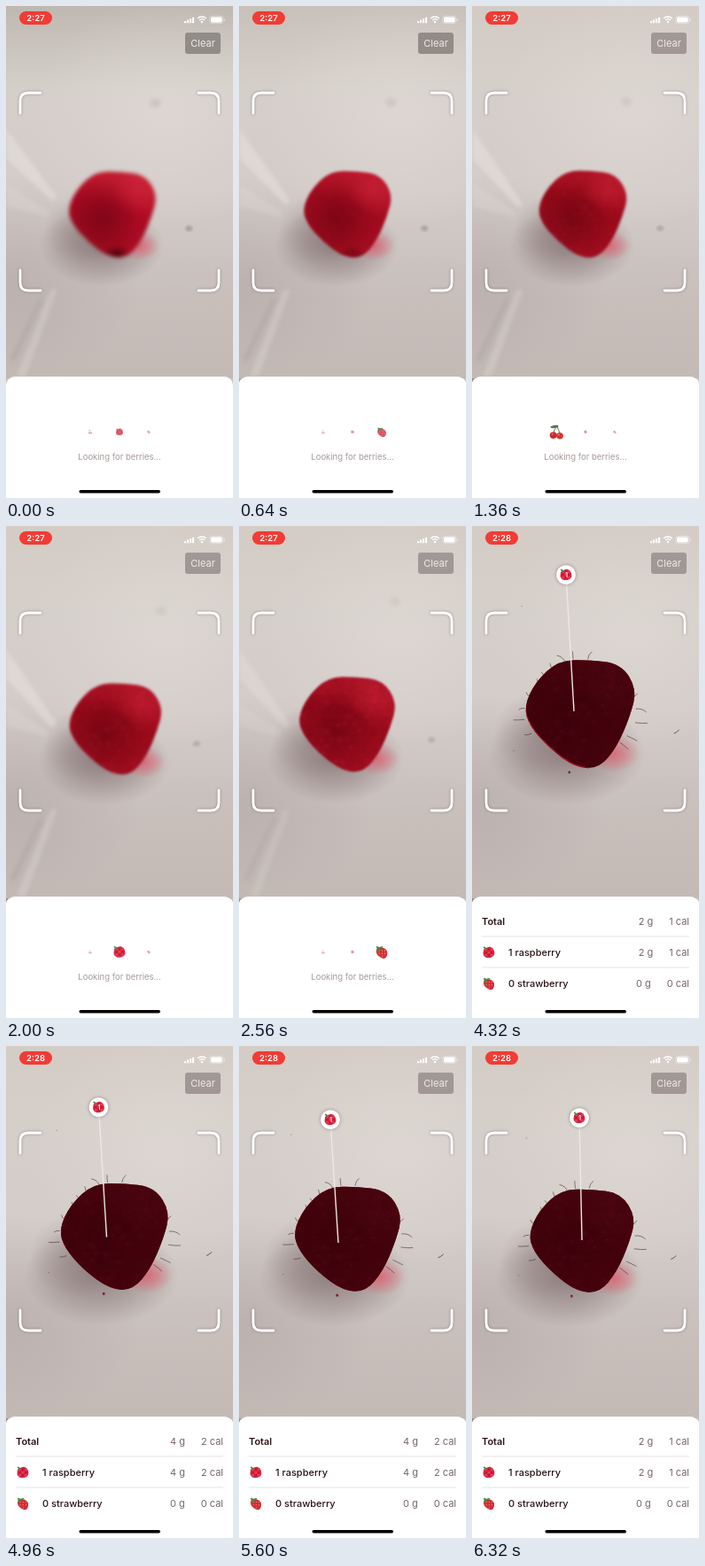
Write an HTML page with a canvas that moves like this. It is 256 px wide and 555 px high and loops after 6400 ms.

```html
<!DOCTYPE html>
<html lang="en">
<head>
<meta charset="utf-8">
<style>
html, body { margin: 0; width: 100%; height: 100%; overflow: hidden; background: #cbc4c0; }
canvas { display: block; width: 256px; height: 555px; }
</style>
</head>
<body>
<canvas id="stage"></canvas>
<script>
const W = 256, H = 555, LOOP = 6400, STEP = 80, DETECTED = 3840;
const dpr = window.devicePixelRatio || 1;
const stage = document.getElementById('stage');
const layer = document.createElement('canvas');
for (const c of [stage, layer]) { c.width = W * dpr; c.height = H * dpr; }
const g = stage.getContext('2d'), b = layer.getContext('2d');
g.scale(dpr, dpr);
b.scale(dpr, dpr);

// time, centre x, centre y, radius, sharpness
const poses = [
  [0, 120, 235.5, 48.5, 0], [1360, 125, 235, 49, .25], [2560, 122, 224, 53.5, .4],
  [3200, 120, 216, 60, 1], [3600, 119, 213.5, 62, 1], [4320, 122, 212.5, 61, 1],
  [5600, 122.5, 218, 59, 1], [6320, 124, 220, 58, 1], [6400, 124, 220, 58, 1]
];
// time, head x, head y, tip x, tip y
const pins = [
  [3840, 104, 52, 114, 209], [4320, 106, 55, 115, 209],
  [5600, 103, 83, 112, 222], [6320, 121, 81, 124, 219], [6400, 121, 81, 124, 219]
];
const outline = [[-.4, -1], [.18, -1.01], [.76, -.93], [1.05, -.46], [.92, .04], [.68, .6],
  [.35, 1], [-.08, .99], [-.57, .63], [-.94, .21], [-1.04, -.14], [-.83, -.6]];

function sample(track, t) {
  let i = 0;
  while (i < track.length - 2 && track[i + 1][0] <= t) i++;
  const [from, to] = [track[i], track[i + 1]];
  const k = Math.max(0, Math.min(1, (t - from[0]) / (to[0] - from[0])));
  return from.slice(1).map((v, j) => v + (to[j + 1] - v) * k);
}

function seeded(seed) {
  return () => (seed = (seed * 16807) % 2147483647) / 2147483647;
}

function blob(c, x, y, r) {
  const at = i => outline[i % outline.length];
  c.beginPath();
  for (let i = 0; i <= outline.length; i++) {
    const [px, py] = at(i), [qx, qy] = at(i + 1);
    const mx = x + (px + qx) / 2 * r, my = y + (py + qy) / 2 * r;
    if (i) c.quadraticCurveTo(x + px * r, y + py * r, mx, my);
    else c.moveTo(mx, my);
  }
  c.closePath();
}

function ellipse(c, x, y, rx, ry, fill, turn = 0) {
  c.fillStyle = fill;
  c.beginPath();
  c.ellipse(x, y, rx, ry, turn, 0, Math.PI * 2);
  c.fill();
}

function box(x, y, w, h, r, fill) {
  g.fillStyle = fill;
  g.beginPath();
  g.roundRect(x, y, w, h, r);
  g.fill();
}

function glow(c, x, y, rx, ry, rgb, alpha) {
  c.save();
  c.translate(x, y);
  c.scale(rx, ry);
  const fade = c.createRadialGradient(0, 0, 0, 0, 0, 1);
  fade.addColorStop(0, `rgba(${rgb},${alpha})`);
  fade.addColorStop(.5, `rgba(${rgb},${alpha * .55})`);
  fade.addColorStop(1, `rgba(${rgb},0)`);
  c.fillStyle = fade;
  c.fillRect(-1, -1, 2, 2);
  c.restore();
}

function text(str, x, y, size, weight, fill, align = 'left') {
  g.font = `${weight} ${size}px Inter, sans-serif`;
  g.textAlign = align;
  g.fillStyle = fill;
  g.fillText(str, x, y);
  return g.measureText(str).width;
}

function streak(points, alpha, rgb) {
  g.fillStyle = `rgba(${rgb},${alpha})`;
  g.beginPath();
  points.forEach(([x, y]) => g.lineTo(x, y));
  g.fill();
}

function drawTable([x, y, r, sharp], t) {
  const late = Math.min(1, t / 1400);
  const wash = g.createLinearGradient(0, 0, 0, 420);
  const top = [190 + 22 * late, 184 + 20 * late, 177 + 20 * late];
  wash.addColorStop(0, `rgb(${top})`);
  wash.addColorStop(.22, '#d5cfca');
  wash.addColorStop(.5, '#d3ccc9');
  wash.addColorStop(.78, '#c8bfbb');
  wash.addColorStop(1, '#c3bab5');
  g.fillStyle = wash;
  g.fillRect(0, 0, W, 420);
  glow(g, 180, 120, 150, 130, '228,222,217', .5);
  glow(g, 0, 310, 150, 120, '165,153,152', .38);

  const marks = Math.max(0, 1 - Math.max(0, t - 2300) / 800);
  if (marks) {
    g.save();
    g.filter = `blur(${2 * dpr}px)`;
    const drift = late * 8;
    streak([[0, 138], [0, 172], [52, 220 + drift], [58, 216 + drift]], .38 * marks, '238,235,233');
    streak([[0, 200], [0, 226], [48, 238], [48, 232]], .22 * marks, '232,229,227');
    streak([[50, 320], [58, 320], [22, 418], [12, 418]], .3 * marks, '230,225,222');
    streak([[38, 330], [42, 330], [10, 400], [4, 400]], .25 * marks, '150,142,139');
    g.restore();
  }

  glow(g, x - r * .25, y + r * .72, r * 1.45, r * .95, '112,91,94', .62);
  glow(g, x - r * .7, y + r * .35, r * .9, r * .8, '125,105,108', .35);
  glow(g, x + r * .62, y + r * .72, r * .48, r * .35, '240,60,85', .55);

  const sx = x + r * 1.78, sy = y + r * .32;
  glow(g, sx, sy, 6, 5, '120,110,106', .5 * (1 - sharp));
  glow(g, x + r, y - r * 2.6, 9, 8, '160,154,149', .3 * (1 - sharp));
  if (sharp > .6) {
    g.strokeStyle = '#655554';
    g.lineWidth = 1;
    g.beginPath();
    g.moveTo(sx - 3, sy + 2);
    g.quadraticCurveTo(sx, sy + 1, sx + 3, sy - 2);
    g.stroke();
    ellipse(g, x - r * .2, y + r * 1.07, 1.4, 1.6, '#702638');
    ellipse(g, x - r * 1.23, y + r * .67, .7, .7, '#806f70');
    ellipse(g, x - r * 1.08, y - r * 2, 1, .7, '#aaa099');
  }
}

function drawHairs(x, y, r, alpha) {
  const rand = seeded(71);
  g.strokeStyle = `rgba(74,48,48,${alpha})`;
  g.lineWidth = .8;
  for (let i = 0; i < 19; i++) {
    const a = Math.PI * (.88 + i / 18 * 1.3) + rand() * .1;
    const edge = r * (.96 + .08 * Math.cos(4 * a));
    const len = 5 + rand() * 9, bend = (rand() - .5) * 1.3;
    const px = x + Math.cos(a) * edge, py = y + Math.sin(a) * edge;
    g.beginPath();
    g.moveTo(px, py);
    g.quadraticCurveTo(px + Math.cos(a) * len * .6, py + Math.sin(a) * len * .6,
      px + Math.cos(a + bend) * len, py + Math.sin(a + bend) * len);
    g.stroke();
  }
}

function drawBerry([x, y, r, sharp], t) {
  b.clearRect(0, 0, W, H);
  b.save();
  blob(b, x, y, r);
  b.clip();
  const skin = b.createLinearGradient(x + r * .5, y - r, x - r * .3, y + r);
  const early = Math.max(0, 1 - t / 1200);
  skin.addColorStop(0, `rgb(${186 + 12 * early},${22 + 12 * early},${42 + 10 * early})`);
  skin.addColorStop(.45, `rgb(${156 + 16 * early},10,${27 + 8 * early})`);
  skin.addColorStop(1, '#a20d20');
  b.fillStyle = skin;
  b.fillRect(0, 0, W, H);
  glow(b, x - r * .25, y + r * .1, r * .9, r * .9, '88,0,12', .5);
  glow(b, x + r * .6, y - r * .55, r * .6, r * .5, '222,44,65', .35);
  glow(b, x + r * .1, y + r * .9, r * .3, r * .18, '50,0,8', .75 * early);

  const rand = seeded(29);
  for (let row = -6; row <= 6; row++) for (let col = -6; col <= 6; col++) {
    const px = x + r * (col * .17 + (row & 1) * .085 + (rand() - .5) * .06);
    const py = y + r * (row * .16 + (rand() - .5) * .06);
    const lit = rand(), size = r * (.075 + rand() * .035);
    ellipse(b, px + 1, py + 1.2, size, size, `rgba(65,0,12,${.22 * sharp})`);
    ellipse(b, px, py, size, size * .85, `rgba(218,38,58,${.24 * lit * sharp})`);
    if (lit > .72) ellipse(b, px - 1, py - 1, 1.4, .7, `rgba(255,130,145,${.35 * sharp})`, -.5);
  }

  if (t >= DETECTED) {
    const [mx, my, mr] = sample(poses, t - 160);
    const slip = Math.max(0, 1 - Math.abs(t - 4320) / 400) * 2;
    b.fillStyle = 'rgba(45,0,8,.78)';
    blob(b, mx + slip, my - slip, mr * 1.01);
    b.fill();
  }
  b.restore();

  if (sharp > .5) drawHairs(x, y, r, (sharp - .5) * 1.5);
  g.save();
  g.filter = `blur(${(.35 + 1.6 * (1 - sharp)) * dpr}px)`;
  g.drawImage(layer, 0, 0, W, H);
  g.restore();
}

function leaf(x, y, turn) {
  ellipse(g, x, y, 2.6, 1.1, '#4d8a45', turn);
}

// Icons are drawn in a 16 px cell around the origin.
const icons = {
  cherry() {
    g.strokeStyle = '#6d7446';
    g.lineWidth = 1;
    g.beginPath();
    g.moveTo(-3, 2);
    g.quadraticCurveTo(-3, -3, 1, -6);
    g.quadraticCurveTo(3, -2, 4, 2);
    g.stroke();
    ellipse(g, -2, -6, 4.5, 1.5, '#55754e', -.15);
    ellipse(g, -3.3, 3.8, 4, 3.7, '#cb292d');
    ellipse(g, 4, 4.3, 3.9, 3.6, '#d63430');
    ellipse(g, -4.4, 2.5, 1.1, .8, '#f08b82');
    ellipse(g, 3, 3, 1.1, .8, '#f08b82');
  },
  raspberry() {
    g.fillStyle = '#d8243f';
    g.beginPath();
    g.moveTo(-6.5, -1);
    g.bezierCurveTo(-7, -5, -3, -5, -2, -6);
    g.bezierCurveTo(2, -8, 6, -5, 6.5, -1);
    g.bezierCurveTo(8, 4, 4, 6.5, 0, 6.5);
    g.bezierCurveTo(-5, 7, -8, 3, -6.5, -1);
    g.fill();
    for (let i = 0; i < 9; i++)
      ellipse(g, (i % 3 - 1) * 3.6, (Math.floor(i / 3) - 1) * 3.4, 1.4, 1.2, i % 2 ? '#ba1732' : '#e94159');
    leaf(-4.5, -5, .7);
  },
  strawberry() {
    g.fillStyle = '#d22d37';
    g.beginPath();
    g.moveTo(-5.5, -4);
    g.bezierCurveTo(1, -7, 7, -3, 6.5, 2);
    g.bezierCurveTo(6, 7, 3, 8, 1, 7.5);
    g.bezierCurveTo(-5, 5, -8, 1, -5.5, -4);
    g.fill();
    for (let i = 0; i < 8; i++)
      ellipse(g, i % 3 * 3.3 - 3, Math.floor(i / 3) * 3.3 - 1.5, .5, .7, '#f3b184');
    leaf(-4, -5, .5);
    leaf(-1, -5, -.3);
    leaf(-4.5, -3, 1.3);
  }
};

function icon(name, x, y, size, alpha = 1) {
  g.save();
  g.globalAlpha = alpha;
  g.translate(x, y);
  g.scale(size / 16, size / 16);
  icons[name]();
  g.restore();
}

function drawFrame() {
  g.save();
  g.strokeStyle = '#fff';
  g.lineWidth = 2.8;
  g.lineCap = 'round';
  g.shadowColor = 'rgba(60,50,50,.45)';
  g.shadowBlur = 3 * dpr;
  for (const sx of [-1, 1]) for (const sy of [-1, 1]) {
    const x = 128 + sx * 112, y = 209.5 + sy * 111.5;
    g.beginPath();
    g.moveTo(x, y - sy * 23);
    g.lineTo(x, y - sy * 9);
    g.quadraticCurveTo(x, y, x - sx * 9, y);
    g.lineTo(x - sx * 23, y);
    g.stroke();
  }
  g.restore();
}

function drawStatus(t) {
  box(15, 6, 37, 15, 7.5, '#f23b34');
  text(t < 3200 ? '2:27' : '2:28', 33.5, 17, 9.5, 600, '#fff', 'center');
  for (let i = 0; i < 4; i++) box(201 + i * 3, 17 - i * 1.4, 2.1, 2.2 + i * 1.4, .5, '#fff');
  g.strokeStyle = '#fff';
  g.lineWidth = 1.4;
  for (const r of [3.8, 6.6]) {
    g.beginPath();
    g.arc(221, 18.6, r, -Math.PI * .76, -Math.PI * .24);
    g.stroke();
  }
  ellipse(g, 221, 18, 1.2, 1.2, '#fff');
  g.strokeStyle = 'rgba(255,255,255,.5)';
  g.lineWidth = .7;
  g.beginPath();
  g.roundRect(229.8, 11.4, 15, 8.2, 2.4);
  g.stroke();
  box(231, 12.6, 12.6, 5.8, 1.4, '#fff');
  box(245.6, 14, 1, 3, .5, 'rgba(255,255,255,.6)');
  box(202, 30, 40, 24, 3, t < 800 ? '#928c87' : '#a19896');
  text('Clear', 222, 46, 11, 400, '#eeeae8', 'center');
}

function drawLoader(t) {
  const period = 1740;
  ['cherry', 'raspberry', 'strawberry'].forEach((name, i) => {
    const peak = 1360 + i * period / 3;
    const gap = (t - peak) / period;
    const d = (gap - Math.round(gap)) * period;
    const k = Math.exp(-((d / 225) ** 2));
    icon(name, 95 + i * 33, 480.5, 4 + 12 * k, .4 + .6 * k);
  });
  text('Looking for berries...', 128, 511.5, 9.5, 400, '#a59b98', 'center');
}

function row(label, grams, cal, y, weight) {
  text(label, weight > 500 ? 11 : 41, y, 11, weight, '#2a1215');
  const width = text(`${cal} cal`, 245, y, 11, 400, '#766466', 'right');
  text(`${grams} g`, 245 - width - 18, y, 11, 400, '#766466', 'right');
}

function drawResults(t) {
  const cal = t >= 4960 && t < 6000 ? 2 : 1;
  row('Total', cal * 2, cal, 450, 600);
  row('1 raspberry', cal * 2, cal, 485, 500);
  row('0 strawberry', 0, 0, 520, 500);
  for (const y of [462.5, 497.5]) box(11, y, 234, 1, 0, '#e7e3e3');
  icon('raspberry', 19, 481, 15);
  icon('strawberry', 19, 516, 15);
}

function drawPin(t) {
  const [hx, hy, tx, ty] = sample(pins, t);
  g.strokeStyle = '#eee7e5';
  g.lineWidth = 1.4;
  g.beginPath();
  g.moveTo(hx, hy);
  g.lineTo(tx, ty);
  g.stroke();
  g.save();
  g.shadowColor = 'rgba(50,35,35,.4)';
  g.shadowBlur = 4 * dpr;
  ellipse(g, hx, hy, 10.8, 10.8, '#fff');
  g.restore();
  icon('raspberry', hx, hy, 15);
  text('1', hx + .5, hy + 2.8, 7.5, 500, '#fff', 'center');
}

function draw(now) {
  const t = Math.floor(now % LOOP / STEP) * STEP;
  const pose = sample(poses, t);
  drawTable(pose, t);
  drawBerry(pose, t);
  drawFrame();
  if (t >= DETECTED) drawPin(t);
  drawStatus(t);
  box(0, 418, W, 150, 10, '#fff');
  if (t < DETECTED) drawLoader(t);
  else drawResults(t);
  box(82.5, 546, 91.5, 3.4, 1.7, '#000');
}

let start;
function tick(now) {
  start ??= now;
  draw(now - start);
  requestAnimationFrame(tick);
}
requestAnimationFrame(tick);
</script>
</body>
</html>
```
